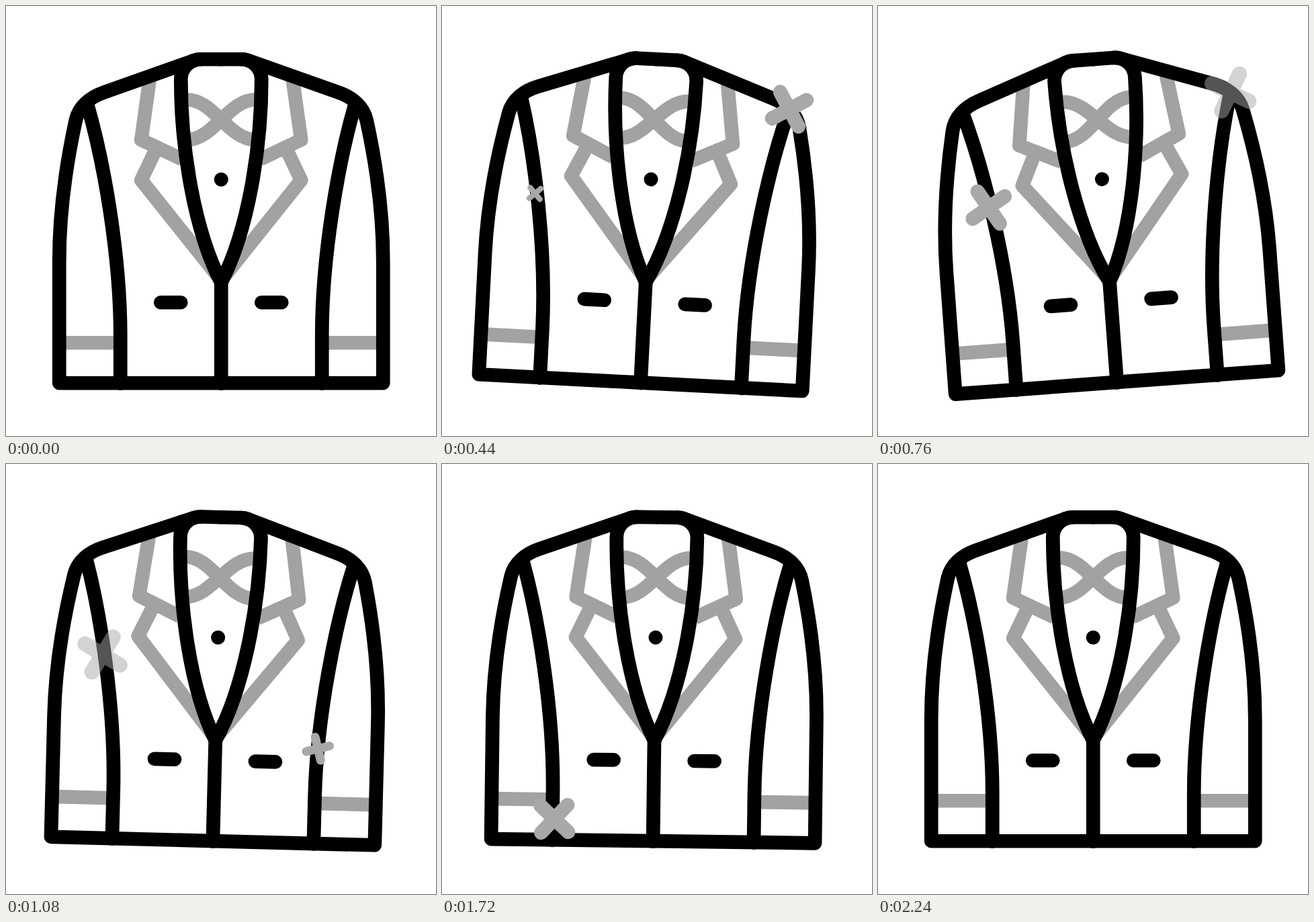
Recreate the animation shown at these times as an HTML page. Size 640 px wide and 640 px high, loop 2520 ms.

```html
<!DOCTYPE html>
<html lang="en">
<head>
<meta charset="utf-8">
<title>Swinging jacket</title>
<style>
  html, body { margin: 0; width: 100%; height: 100%; overflow: hidden; background: #fff; }
  svg { display: block; width: 100%; height: 100%; }
</style>
</head>
<body>
<svg viewBox="0 0 640 640" fill="none" stroke-width="20.7" stroke-linejoin="round">
  <defs>
    <g id="trim">
      <path d="M214 106L201 199L262 228"/>
      <path d="M221 217L201 259L320 408"/>
      <path d="M262 139H268C310 139 330 199 372 199H378"/>
      <path d="M79 501H170"/>
    </g>
    <g id="half">
      <path d="M320 79H290Q285 79 279.8 80.8L145 128.5C124 136 108 150 103.5 170C90 232 79 303 79 380V561H320"/>
      <path d="M320 411C280 335 260 210 260 109A30 30 0 0 1 290 79"/>
      <path d="M121 147C145 230 170 370 170 490V561.5"/>
      <path d="M230 441H260"/>
    </g>
    <path id="cross" d="M-28.3 0H28.3M0 -28.3V28.3"/>
  </defs>
  <g id="jacket" stroke-linecap="round">
    <g transform="translate(.25 .25)">
      <g stroke="#a2a2a2" stroke-linecap="butt">
        <use href="#trim"/>
        <use href="#trim" transform="translate(640) scale(-1 1)"/>
      </g>
      <g stroke="#000">
        <use href="#half"/>
        <use href="#half" transform="translate(640) scale(-1 1)"/>
        <path d="M320 411V561.5"/>
        <circle cx="320" cy="258" r="10.5" fill="#000" stroke="none"/>
      </g>
    </g>
    <g id="sparkles" stroke="#a8a8a8"></g>
  </g>
</svg>
<script>
const LOOP = 2520, STEP = 40, SWING = 320;
const angles = [0, 8, -8, 4, -4, 2, -2, 0];
const sparkles = [
  { x: 520.5, y: 143.5, start: 0 },
  { x: 149, y: 288, start: 320 },
  { x: 473, y: 420, start: 916 },
  { x: 173, y: 530, start: 1340 }
];

const jacket = document.getElementById("jacket");
const layer = document.getElementById("sparkles");
for (const s of sparkles) {
  s.node = document.createElementNS("http://www.w3.org/2000/svg", "use");
  s.node.setAttribute("href", "#cross");
  layer.append(s.node);
}

// Eased progress between two times
function ease(t, from, to) {
  const u = Math.min(1, Math.max(0, (t - from) / (to - from)));
  return u * u * (3 - 2 * u);
}

function swing(t) {
  const i = Math.min(Math.floor(t / SWING), angles.length - 2);
  return angles[i] + (angles[i + 1] - angles[i]) * ease(t, i * SWING, (i + 1) * SWING);
}

function drawSparkle({ node, x, y, start }, t) {
  const age = t - start;
  const pop = ease(age, 0, 280), drift = ease(age, 280, 700);
  const fade = ease(age, 720, 800);
  const visible = age > 0 && fade < 1;
  node.setAttribute("display", visible ? "inline" : "none");
  if (!visible) return;
  node.setAttribute("opacity", 1 - fade);
  node.setAttribute("transform",
    `translate(${x} ${y}) rotate(${120 * pop + 90 * drift}) scale(${pop + 0.08 * drift})`);
}

function draw(t) {
  jacket.setAttribute("transform", `rotate(${swing(t)} 320 79)`);
  for (const s of sparkles) drawSparkle(s, t);
}

const begin = performance.now();
function tick() {
  const t = (performance.now() - begin) % LOOP;
  draw(Math.floor(t / STEP) * STEP);
  requestAnimationFrame(tick);
}
tick();
</script>
</body>
</html>
```
